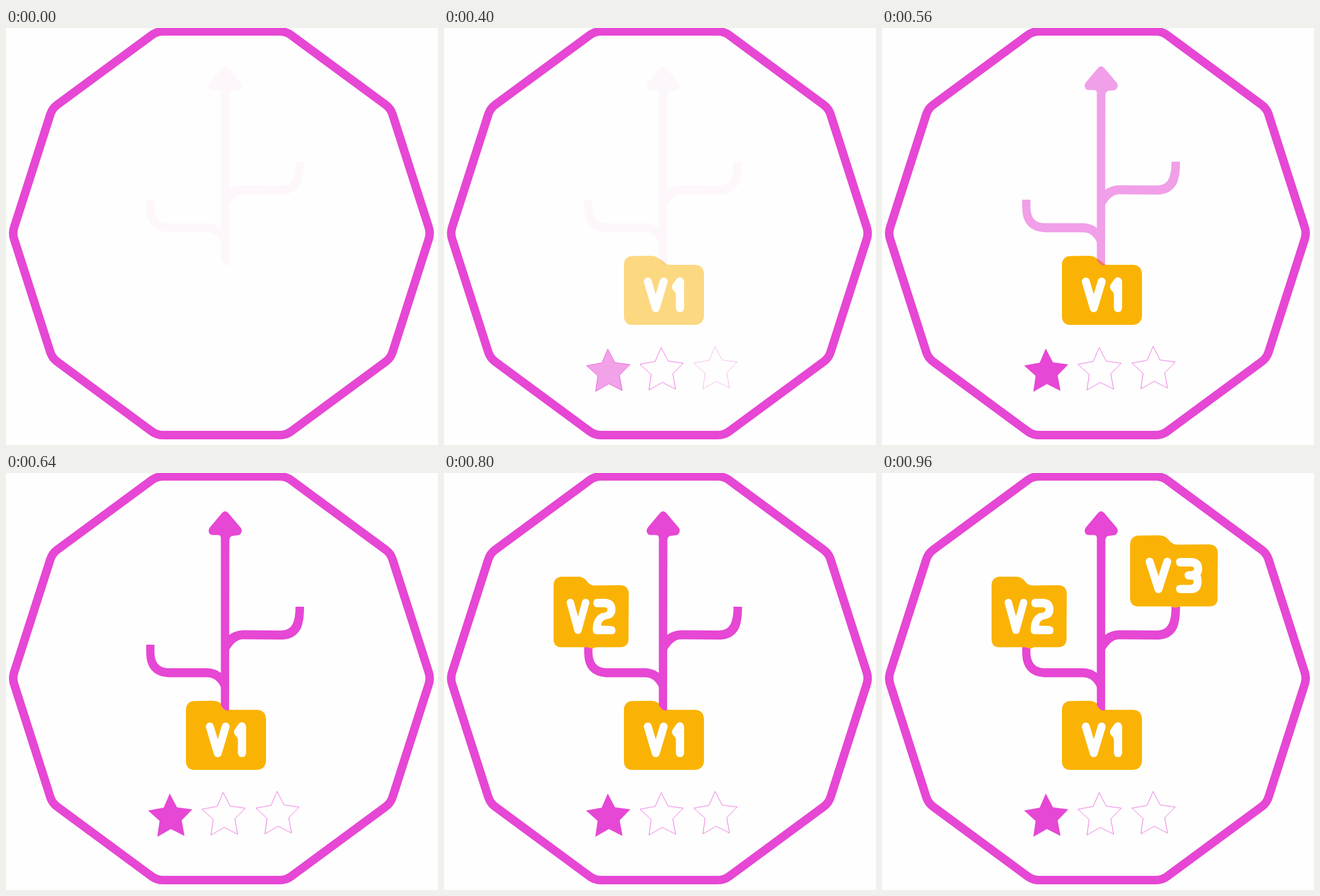
Write an HTML page that moves like this. It is 761x736 px and loops after 2880 ms.

```html
<!DOCTYPE html>
<html lang="en">
<head>
<meta charset="utf-8">
<title>Version branches</title>
<style>
  html, body { margin: 0; width: 100%; height: 100%; overflow: hidden; background: #fefefe; }
  svg { display: block; width: 761px; height: 736px; }

  .pink { fill: #e647d4; }
  .folder { fill: #fab304; }
  .ring { fill: none; stroke: #e647d4; stroke-width: 15; }
  .outline { fill: none; stroke: #e647d4; stroke-width: .8; }
  .glyph { fill: #fefefe; }
  .vee { fill: none; stroke: #fefefe; stroke-width: 14; stroke-linecap: round; stroke-linejoin: round; }

  /* Each part fades in over four ticks of 40 ms, one after the other. */
  .fade { animation: 2880ms steps(4, end) infinite; }
  .one { animation-name: one; }
  .two { animation-name: two; }
  .three { animation-name: three; }
  .branches { animation-name: branches; }
  .left { animation-name: left; }
  .right { animation-name: right; }

  @keyframes one { 0% { opacity: 0 } 5.55%, 100% { opacity: 1 } }
  @keyframes two { 0%, 5.55% { opacity: 0 } 11.11%, 100% { opacity: 1 } }
  @keyframes three { 0%, 11.11% { opacity: 0 } 16.66%, 100% { opacity: 1 } }
  @keyframes branches { 0%, 16.66% { opacity: .035 } 22.22%, 100% { opacity: 1 } }
  @keyframes left { 0%, 22.22% { opacity: 0 } 27.77%, 100% { opacity: 1 } }
  @keyframes right { 0%, 27.77% { opacity: 0 } 33.33%, 100% { opacity: 1 } }
</style>
</head>
<body>
<svg viewBox="0 0 761 736">
  <defs>
    <path id="star" d="M288.5 566.5 301 590.5 327.5 594 309 613 314 640 290.5 628 267 641.5 271 614 251 596 278 591Z"/>
  </defs>

  <path id="ring" class="ring"/>

  <g class="fade three" role="img" aria-label="V1">
    <path class="folder" d="M317 417Q318 403 332 402.5L364 402Q374 402 380 408Q384 409 388 413Q392 418 397 418L443 418Q457 419 458 434L458 508Q457 523 442 524L330 524Q318 523 317 510Z"/>
    <path class="vee" d="M359 447.5 373 494.5 387 447.5"/>
    <path class="glyph" d="M415 440Q422 440 423 448L423 494Q422 501.5 416 501.5Q409 501.5 408.5 494L408.5 471Q408 466 404 463Q399 457 404 451L409 444Q412 440 415 440Z"/>
  </g>

  <g class="fade branches pink">
    <path d="M381 70Q386 65 391 70L413 96Q417 101 414 106Q412 110 407 110L399 111Q394 112 393.5 118L393 416Q393 419 390 419.5Q384 419 378.5 410L378.5 116Q379 110 374 109.5L364 109.5Q358 109 357 103Q357 98 360 95Z"/>
    <path d="M392.5 286Q403 278 418 277.5L484 278Q496 278 502 271Q510 261 510 236L525 236Q525 262 519 275Q509 293 487 294L418 293.5Q404 293 392.5 313Z"/>
    <path d="M247 303H261.5V317Q262 343 284 344.5L354 344.5Q369 345 379 353V379Q371 361 355 360.5L286 360.5Q247 358 247 317Z"/>
  </g>

  <g class="fade left" role="img" aria-label="V2">
    <path class="folder" d="M193 199Q193 184 207 183L235 183Q244 182 251 190Q256 198 264 198.5L311 198Q325 199 325.5 213L325 293Q325 307 310 307.5L267 307.5Q262 312 253 307.5L206 307.5Q193 307 193 293Z"/>
    <path class="vee" style="stroke-width:13" d="M222.5 228.5 236 277.5 249.5 228.5"/>
    <path class="glyph" d="M270 222L285 222Q302 224 302 241Q302 256 286 258Q276 261 277 269.5L295 270Q302 271 302 278Q302 284 296 284.5L268 284.5Q262 284 262 277Q262 254 278 247Q288 247 288 241Q288 237 282 237L270 237Q263 236 263 229.5Q263 222 270 222Z"/>
  </g>

  <g class="fade right" role="img" aria-label="V3">
    <path class="folder" d="M437 126Q438 111 452 110.5L488 110Q498 110 504 117Q511 126 519 126.5L577 126Q591 127 591.5 141L591 222Q591 235 577 235.5L523 235.5Q517 240 510 235.5L451 235.5Q438 235 437 222Z"/>
    <path class="vee" d="M471.5 156.5 487 205 502.5 156.5"/>
    <path class="glyph" d="M526 150L545 150Q563 151 564 168Q564 176 561 180.5Q563 184 563 193Q562 211 546 212L525 212Q518 211 518 204.5Q518 198 525 197.5L543 197.5Q549 197 549 192Q549 188 545 188L539 188Q533 186 533 180.5Q533 174 540 173.5L546 173Q550 172 550 168Q549 165 543 165L525 165Q518 164 518 157Q518 150 526 150Z"/>
  </g>

  <use href="#star" class="fade three pink"/>
  <use href="#star" class="fade one outline"/>
  <use href="#star" class="fade two outline" x="94" y="-2.5"/>
  <use href="#star" class="fade three outline" x="189" y="-4.5"/>
</svg>
<script>
  // Decagon with softly rounded corners.
  const corner = k => {
    const a = k * Math.PI / 5;
    return [379.5 + 368.5 * Math.cos(a), 362.3 + 374.6 * Math.sin(a)];
  };
  const toward = ([x, y], [u, v], dist) => {
    const f = dist / Math.hypot(u - x, v - y);
    return [x + (u - x) * f, y + (v - y) * f];
  };
  let d = "";
  for (let k = 0; k < 10; k++) {
    const p = corner(k);
    const start = toward(p, corner(k - 1), 11);
    const end = toward(p, corner(k + 1), 11);
    d += `${k ? "L" : "M"}${start}Q${p} ${end}`;
  }
  document.getElementById("ring").setAttribute("d", d + "Z");
</script>
</body>
</html>
```
